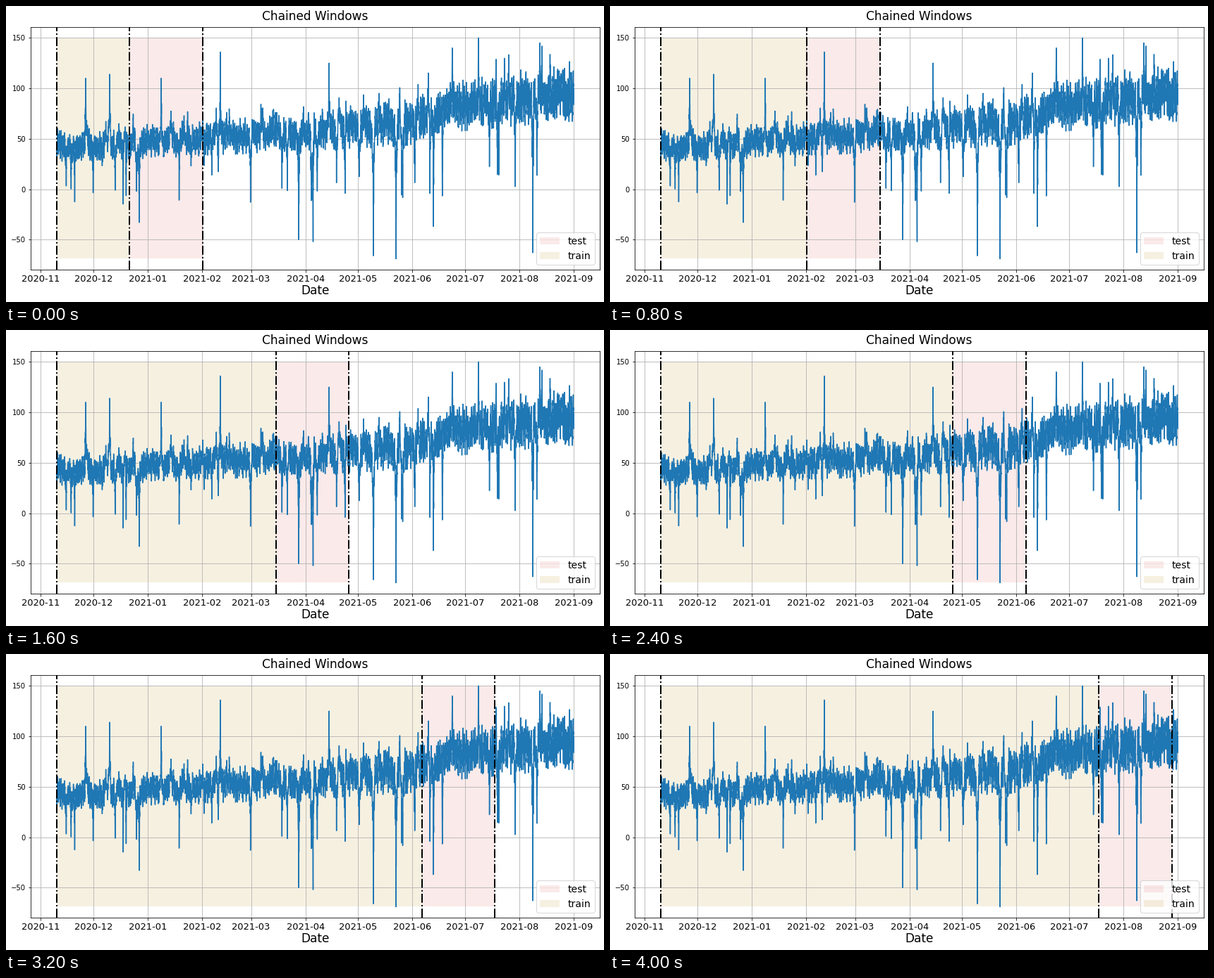
These frames come from a looping animation (848x421 px, 4800 ms). A matplotlib script:

```python
import numpy as np
import matplotlib.pyplot as plt
import matplotlib.dates as mdates
from matplotlib.animation import FuncAnimation

W, H, DPI = 848, 421, 72
LEFT, RIGHT, TOP, BOTTOM = 34.95, 841.95, 29.7, 375.2
LOW, HIGH = -69, 150
DAYS = 295
STEP = 1000 / 24       # a window is 1000 hours long

plt.rcParams["font.family"] = "DejaVu Sans"

# Extremes that shape the series: day, value
PEAKS = [(16.6, 110), (30.3, 114), (59.7, 110), (93.4, 136),
         (155.4, 125), (225.7, 140), (240.6, 150), (275.6, 145)]
DROPS = [(47.2, -33), (138.1, -50), (146.3, -52), (180.7, -66),
         (193.6, -69), (214.9, -37), (271.6, -63)]


def make_series():
    rng = np.random.default_rng(11)
    n = DAYS * 24
    hour = np.arange(n)
    day = hour / 24
    knots = [0, 50, 120, 208, 214, 295]
    mid = np.interp(day, knots, [43, 46, 54, 67, 79, 95])
    half = np.interp(day, knots, [13, 13, 15, 19, 20, 23])

    # Daily swing whose strength and level change from day to day
    swing = np.interp(day, range(DAYS), rng.uniform(0.5, 0.85, DAYS))
    drift = np.interp(day, range(DAYS), rng.normal(0, 0.2, DAYS))
    wave = swing * np.sin(2 * np.pi * (hour - 9) / 24) + drift
    y = mid + half * np.clip(wave + rng.normal(0, 0.26, n), -1.2, 1.4)

    def pull(at_day, value, reach):
        at = int(at_day * 24)
        weight = np.exp(-np.abs(hour - at) / reach) * rng.uniform(0.4, 1, n)
        weight[at] = 1
        y[:] += (value - y) * weight

    for d in rng.uniform(0, DAYS - 1, 36):
        i = int(d * 24)
        pull(d, mid[i] + half[i] * rng.uniform(1.4, 2.3), 6)
    for d in rng.uniform(3, DAYS - 10, 36):
        pull(d, rng.uniform(-15, 25), 6)
    for d, value in PEAKS + DROPS:
        pull(d, value, 8)
    return np.clip(y, LOW, HIGH)


start = np.datetime64("2020-11-10T01", "h")
times = mdates.date2num(start + np.arange(DAYS * 24))
day0 = times[0]

fig = plt.figure(figsize=(W / DPI, H / DPI), dpi=DPI, facecolor="white")
ax = fig.add_axes([LEFT / W, 1 - BOTTOM / H,
                   (RIGHT - LEFT) / W, (BOTTOM - TOP) / H])
ax.plot(times, make_series(), color="#1f77b4", lw=1.5)

span = times[-1] - day0
margin = 0.05 * (HIGH - LOW)
ax.set_xlim(day0 - 0.05 * span, times[-1] + 0.05 * span)
ax.set_ylim(LOW - margin, HIGH + margin)
ax.xaxis.set_major_locator(mdates.MonthLocator())
ax.xaxis.set_major_formatter(mdates.DateFormatter("%Y-%m"))
ax.set_yticks(range(-50, 151, 50))
ax.tick_params(axis="x", labelsize=13)
ax.tick_params(axis="y", labelsize=10)
ax.grid(True)
ax.set_title("Chained Windows", fontsize=17, pad=10)
fig.text((LEFT + RIGHT) / 2 / W, 1 - 410 / H, "Date", fontsize=17,
         ha="center", va="baseline")


def window(color, label):
    box = plt.Rectangle((day0, LOW), 1, HIGH - LOW, facecolor=color,
                        alpha=0.12, lw=0, label=label)
    return ax.add_patch(box)


test = window("#d9534f", "test")
train = window("darkgoldenrod", "train")
marks = [ax.axvline(day0, color="black", ls="-.", lw=2) for _ in range(3)]
ax.legend(handles=[test, train], loc="lower right", fontsize=14)


def update(i):
    split = day0 + (i + 1) * STEP
    train.set_width(split - day0)
    test.set_x(split)
    test.set_width(STEP)
    for mark, pos in zip(marks, (day0, split, split + STEP)):
        mark.set_xdata([pos, pos])
    return [train, test, *marks]


anim = FuncAnimation(fig, update, frames=6, interval=800, repeat=True,
                     repeat_delay=0, blit=False)
plt.show()
```
